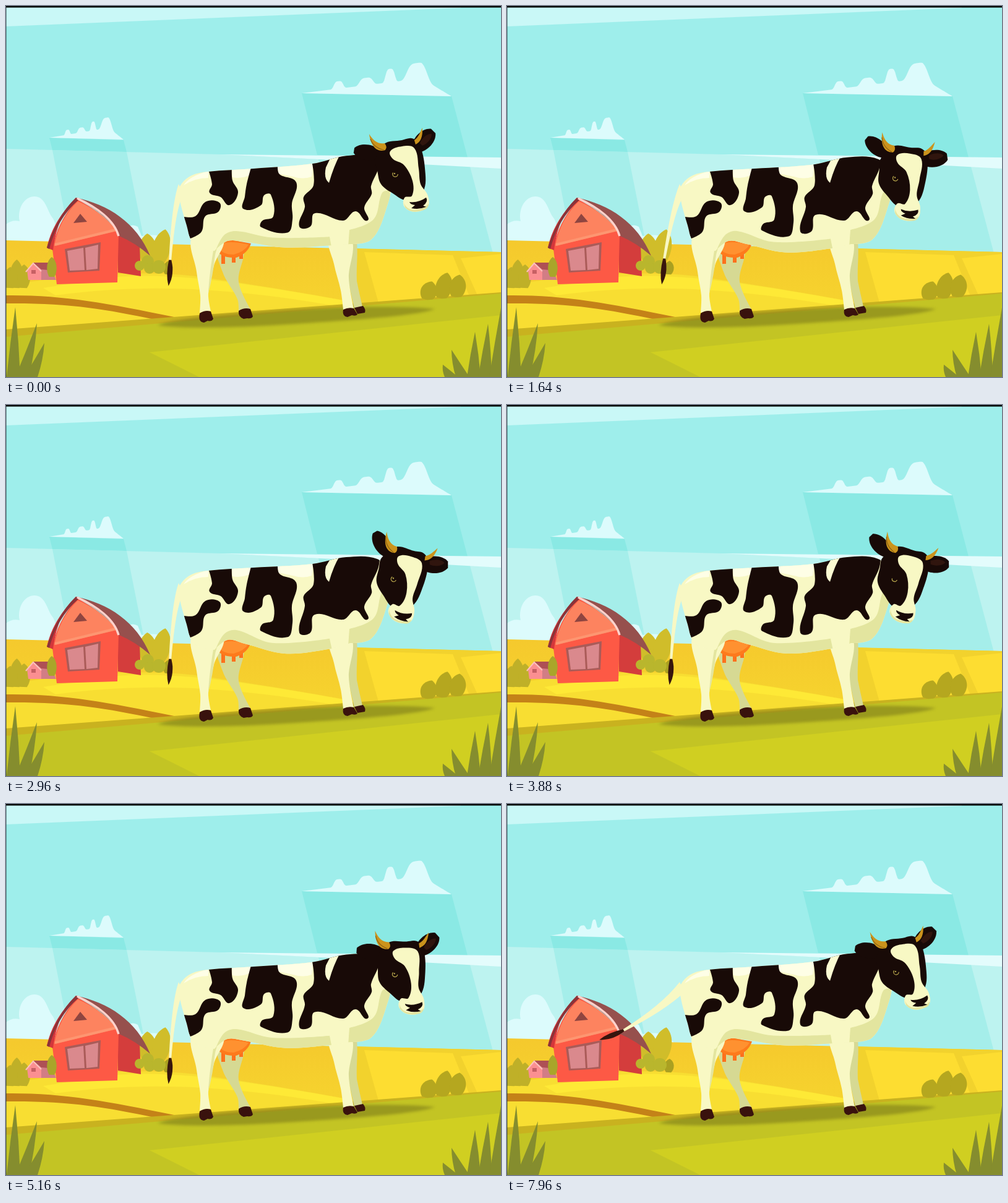
An HTML page with a canvas that plays this animation: 800 px wide and 600 px high, repeating every 8000 ms.

```html
<!DOCTYPE html>
<html lang="en">
<head>
<meta charset="utf-8">
<title>Cow in a field</title>
<style>
html, body { margin: 0; width: 100%; height: 100%; overflow: hidden; background: #9eeeeb; }
canvas { display: block; width: 800px; height: 600px; }
</style>
</head>
<body>
<canvas id="stage" width="800" height="600"></canvas>
<script>
const LOOP = 8000, RAD = Math.PI / 180;
const CREAM = '#f8f8c4', SHADE = '#e3e59f', FAR = '#d6d993', BLACK = '#180a07', HOOF = '#39120d', GOLD = '#cb931c';
const stage = document.getElementById('stage').getContext('2d');
const scene = document.createElement('canvas');
scene.width = 800;
scene.height = 600;
let g = stage;

const clamp = x => Math.max(0, Math.min(1, x));
const mix = (a, b, k) => a + (b - a) * k;
const ease = x => { x = clamp(x); return x * x * (3 - 2 * x); };
const pulse = (t, start, len) => t > start && t < start + len ? Math.sin(Math.PI * (t - start) / len) ** 2 : 0;

function fill(color, path) {
  g.fillStyle = color;
  g.fill(typeof path === 'string' ? new Path2D(path) : path);
}

function line(color, width, d) {
  g.strokeStyle = color;
  g.lineWidth = width;
  g.stroke(new Path2D(d));
}

// Closed smooth curve through "x,y" points; "!" marks a corner.
function curve(text) {
  const pts = text.split(' ').map(s => ({ xy: s.split(',').map(parseFloat), sharp: s.endsWith('!') }));
  const n = pts.length, path = new Path2D();
  const slope = i => {
    const a = pts[(i + n - 1) % n].xy, b = pts[(i + 1) % n].xy;
    const len = Math.hypot(b[0] - a[0], b[1] - a[1]);
    return pts[i].sharp ? [0, 0] : [(b[0] - a[0]) / len, (b[1] - a[1]) / len];
  };
  path.moveTo(...pts[0].xy);
  for (let i = 0; i < n; i++) {
    const j = (i + 1) % n, [ax, ay] = pts[i].xy, [bx, by] = pts[j].xy;
    const k = Math.hypot(bx - ax, by - ay) * 0.34, u = slope(i), v = slope(j);
    path.bezierCurveTo(ax + u[0] * k, ay + u[1] * k, bx - v[0] * k, by - v[1] * k, bx, by);
  }
  path.closePath();
  return path;
}

const blob = (color, text) => fill(color, curve(text));

function around(x, y, deg, draw) {
  g.save();
  g.translate(x, y);
  g.rotate(deg * RAD);
  g.translate(-x, -y);
  draw();
  g.restore();
}

// Leaf growing from (x, y); 0 degrees points right.
function leaf(color, x, y, len, wide, deg, tip = 0) {
  g.save();
  g.translate(x, y);
  g.rotate(deg * RAD);
  fill(color, `M0 ${-wide * 0.3}C${len * 0.3} ${-wide * 0.7} ${len * 0.8} ${-wide * 0.65} ${len} ${-tip}` +
    `V${tip}C${len * 0.8} ${wide * 0.65} ${len * 0.3} ${wide * 0.7} 0 ${wide * 0.3}Z`);
  g.restore();
}

function dots(color, list) {
  g.fillStyle = color;
  for (const [x, y, r] of list) {
    g.beginPath();
    g.arc(x, y, r, 0, 7);
    g.fill();
  }
}

// Cloud outline: a slope with four bumps, in parts of its width.
const BUMPS = [[0.245, 0.05, 0.035], [0.43, 0.05, 0.05], [0.59, 0.09, 0.035], [0.77, 0.107, 0.075]];
function cloud(x, y, wide, tilt, tall) {
  const path = new Path2D();
  path.moveTo(x, y);
  for (let u = 0; u <= 1; u += 1 / 120) {
    let h = 0.115 * Math.min(u / 0.8, 1, (1 - u) / 0.2);
    for (const [at, high, w] of BUMPS) h += high * Math.exp(-(((u - at) / w) ** 4));
    path.lineTo(x + wide * u, y + tilt * u - wide * tall * h);
  }
  path.lineTo(x + wide, y + tilt);
  fill('#dcfbfc', path);
}

function drawSky() {
  g.fillStyle = '#9eeeeb';
  g.fillRect(0, 0, 800, 600);
  fill('#c9f8f7', 'M0 0H735V3L0 33Z');
  fill('#bdf3f0', 'M0 231L345 240L800 262V410H0Z');
  fill('#8ae9e4', 'M478 141L720 146L746 245L503 241Z M70 213L190 217L195 236L75 233Z');
  fill('#a5eeea', 'M503 241L746 245L787 400H546Z M75 233L195 236L222 372L102 372Z');
  fill('#e3fcfc', 'M345 240L800 245V263L690 257Z');
  cloud(478, 141, 242, 5, 1);
  cloud(70, 213, 120, 3, 1.33);
  fill('#dcfbfc', 'M0 353Q10 345 22 348C18 330 28 308 46 308C63 308 66 329 74 341Q82 350 84 382H0Z');
  fill('#dcfbfc', 'M198 357Q204 352 213 357L219 372Q260 365 272 390H190Z');
}

function drawFields() {
  const gr = g.createLinearGradient(0, 380, 0, 500);
  gr.addColorStop(0, '#f5c92d');
  gr.addColorStop(1, '#f6d52e');
  g.fillStyle = gr;
  g.fill(new Path2D('M0 379L800 398V600H0Z'));
  fill('#f2d22d', 'M562 392L800 398V480H562Z');
  fill('#fddd31', 'M579 398L722 403L750 472L602 480Z M735 408L800 401V470H763Z');
  fill('#f8de32', 'M0 452C120 432 250 425 340 442C430 455 490 466 545 476V530H0Z');
  fill('#fee936', 'M80 468C250 444 400 462 545 487V476C400 450 250 425 150 442L60 456Z');
  fill('#c48218', 'M0 468C90 467 160 480 272 503L240 507C160 490 100 480 0 481Z');
  fill('#c9b21f', 'M0 523L270 503L800 463V500L0 540Z');
}

function drawBarn() {
  for (const [x, len] of [[6, 34], [16, 46], [28, 38]]) leaf('#bfb028', x, 456, len, 19, -88);
  for (const [x, len, deg] of [[230, 48, -92], [246, 56, -78]]) leaf('#d0bd2a', x, 416, len, 26, deg);
  leaf('#aaa021', 261, 434, 22, 14, -85);
  // small barn
  fill('#d27d85', 'M45 415L70 415L81 443L57 443Z');
  fill('#fb8f91', 'M34 427L44 416L57 427V443L36 443Z');
  fill('#ae5055', 'M44 415L70 415L80 428L57 426Z');
  line('#fbc2bd', 2, 'M32 430L44 416L57 429');
  fill('#c76064', 'M41 427H48V433H41Z');
  // large barn
  fill('#d43d3c', 'M180 360L216 388L218 437L181 431Z');
  fill('#96504d', 'M113 310C165 321 211 350 233 404Q209 383 183 372C174 350 145 327 113 310Z');
  fill('#fd5945', 'M115 313C139 325 167 344 182 371L180 447L82 450L75 393Q82 350 115 313Z');
  fill('#fd835f', 'M116 316C140 326 164 342 179 364L78 388Q86 345 116 316Z');
  line('#fd9671', 4, 'M79 386L177 362');
  fill('#d5363a', 'M115 311C96 325 82 350 76 395L66 391C72 365 84 340 113 310Z');
  fill('#8b3339', 'M113 310C90 332 75 362 66 391L70 393C79 360 93 335 117 314Z');
  line('#ffd2cc', 3.5, 'M115 311C146 325 175 346 182 372');
  fill('#8f4540', 'M120 336L131 349L109 351Z');
  fill('#aa5b58', 'M95 393L153 382L151 428L100 431Z');
  fill('#da898d', 'M99 396L125 391L127 427L103 428Z M128 391L149 386L148 425L130 427Z');
  dots('#b9b62d', [[216, 420, 8], [229, 413, 10], [232, 424, 9], [247, 422, 11]]);
  leaf('#a9a52a', 74, 438, 32, 14, -90);
}

function blades(tips, foot, step) {
  tips.forEach(([x, y], i) => {
    const b = foot + step * i;
    fill('#858d2e', `M${b - 11} 600Q${mix(b, x, 0.6) - 7} ${mix(600, y, 0.5)} ${x} ${y}` +
      `Q${mix(b, x, 0.6) + 7} ${mix(600, y, 0.5)} ${b + 11} 600Z`);
  });
}

function drawGrass() {
  for (const [x, y, len, deg] of [[679, 475, 31, -72], [703, 473, 43, -76], [727, 471, 37, -80]])
    leaf('#b5a71f', x, y, len, 24, deg);
  fill('#c3c424', 'M0 535L800 465V600H0Z');
  fill('#d0cf21', 'M232 560L800 500V600H312Z');
  g.filter = 'blur(2px)';
  fill('rgba(112,111,24,.5)', 'M245 516C270 506 340 500 430 494C530 486 640 484 693 490C670 500 575 507 470 514C370 521 280 522 245 516Z');
  g.filter = 'none';
  blades([[15, 487], [50, 513], [62, 545]], 12, 14);
  blades([[706, 580], [720, 556], [758, 527], [779, 514], [800, 488]], 720, 18);
}

function drawScene() {
  g = scene.getContext('2d');
  drawSky();
  drawFields();
  drawBarn();
  drawGrass();
  g.fillStyle = '#000';
  g.fillRect(0, 0, 800, 2.5);
  g.fillStyle = 'rgba(20,50,50,.55)';
  g.fillRect(0, 2, 1, 598);
  g = stage;
}

const swing = t => pulse(t, 0, 750) + pulse(t, 750, 750) + 0.55 * pulse(t, 1500, 900) + pulse(t, 7600, 800);

function drawTail(t) {
  const q = swing(t), a = 98.5 + 44.5 * q, b = 91 + 82 * swing(t - 80);
  const x = 283 + 120 * Math.cos(a * RAD), y = 292 + 120 * Math.sin(a * RAD);
  const nx = 2 * Math.sin(a * RAD), ny = -2 * Math.cos(a * RAD);
  const cx = 271 - 19 * q, cy = 322 + 8 * q;
  fill(CREAM, `M279 288Q${cx - 3} ${cy - 4} ${x - nx} ${y - ny}L${x + nx} ${y + ny}Q${cx + 3} ${cy + 4} 287 304Z`);
  around(x, y, b - 90, () =>
    fill('#37150d', `M${x - 2} ${y}Q${x - 7} ${y + 24} ${x - 2} ${y + 42}Q${x + 8} ${y + 24} ${x + 2} ${y}Z`));
}

function drawLegs() {
  blob(FAR, '344,385 350,430 374,474 376,493! 395,490! 376,446 382,385');
  fill(HOOF, 'M376 493Q385 487 395 490L399 502Q397 506 390 505L384 506Q375 503 376 493Z');
  fill(FAR, 'M550 380H567C569 405 566 420 567 445Q571 465 576 486L563 489Q555 455 550 430Z');
  fill(HOOF, 'M563 488L577 485Q582 491 580 496L568 498Z');
  for (const [x, end] of [[351, 417], [368, 415], [380, 409]]) line('#fd701c', 6, `M${x} 395V${end}`);
  fill('#fd7a1c', 'M339 390Q344 379 362 378L396 384Q390 401 372 407Q343 408 339 390Z');
  fill('#ff9130', 'M343 388Q355 377 392 386Q386 397 368 402Q347 402 343 388Z');
  blob(CREAM, '303,368 308,430 314,468 313,496! 331,493! 327,465 336,420 350,372');
  fill(SHADE, 'M350 375Q339 390 337 409Q335 432 327 465Q328 435 338 378Z');
  fill(HOOF, 'M313 497Q322 491 331 494L335 506Q332 511 326 509L320 512Q310 511 313 497Z');
  blob(CREAM, '524,372 530,417 541,460 545,491! 562,489! 554,440 558,375');
  fill(HOOF, 'M545 491Q553 487 562 489L568 499Q565 502 559 500L552 503Q543 502 545 491Z');
}

// p lowers the head, and with it the belly and shoulders
function drawBody(p) {
  const sag = 12 * p, top = 4 * p;
  const body = curve(`284,287 300,274 326,268 400,263 495,${255 + top / 2} 550,${242 + top} 600,${245 + top} ` +
    `623,275 613,333 590,378 556,385! 525,${387 + sag * 0.6} 450,${390 + sag} 385,${381 + sag * 0.4} 358,380 337,396! 304,386 292,355 279,302`);
  g.save();
  fill(CREAM, body);
  g.clip(body);
  blob(SHADE, `337,400! 352,371 372,364 430,${374 + sag * 0.9} 523,${373 + sag * 0.4}! 530,410! 440,415 360,385`);
  blob(SHADE, '620,298! 608,302 594,345 555,362! 553,392! 590,392 620,350');
  fill('#fefee6', 'M287 290Q296 275 327 267V278Q305 278 287 290Z M365 262L398 261L396 273Q380 280 366 277Z M438 260L497 253L494 276Q480 281 464 276L440 271Z');
  blob(BLACK, '326,262! 365,260! 366,282 375,302 361,322 347,309 329,302 333,288');
  blob(BLACK, '283,340! 306,340 322,317 345,318 343,333 322,340 316,365 298,376!');
  g.save();
  g.translate(0, -262 * 0.09 * p);
  g.scale(1, 1 + 0.09 * p);
  blob(BLACK, '397,258! 439,258! 442,272 469,285 462,320 463,345 455,366 412,357 414,347 432,340 428,305 417,306 412,322 384,328 386,308 389,288');
  g.restore();
  blob(BLACK, `494,250! 530,235! 605,235! 602,262 590,291 591,304 579,326 584,347 565,332 ` +
    `545,347 499,${335 + sag / 3} 492,${356 + sag} 474,${356 + sag} 483,325 481,309 497,290`);
  fill('#fbfbd2', `M526 ${242 + top}L541 ${238 + top}Q530 258 522 286Q513 279 517 261Z`);
  g.restore();
}

function drawEye(t) {
  const shut = pulse(t, 3760, 240) + pulse(t, 7000, 240) > 0.4;
  g.strokeStyle = '#b5a44b';
  g.lineWidth = 1.3;
  g.beginPath();
  g.arc(629, 272, 4.2, 0, (shut ? 170 : 215) * RAD);
  g.stroke();
  if (!shut) dots('#b5a44b', [[628, 271, 1.2]]);
}

function drawHead(t, p) {
  const droop = ease((t - 250) / 1100) * (1 - ease((t - 3900) / 1050));
  const back = pulse(t, 4300, 1700);
  const flick = pulse(t, 7040, 400) + pulse(t, 7440, 400);
  const left = 14 * droop - 13 * back + 13 * (pulse(t, 2720, 440) + pulse(t, 3240, 440)) + 5 * flick;
  const right = 20 * droop - 6 * back - 16 * flick;
  around(606, 271, 26 * p - 1.4, () => {
    leaf(BLACK, 661, 232, 42, 24, right - 45, 5);
    leaf('#30150e', 671, 224, 24, 9, right - 45);
    leaf(BLACK, 604, 240, 42, 22, left + 189, 4);
    blob(BLACK, '597,249 611,223 640,217 656,214 668,223 677,262 674,300 648,314 625,303 606,288 600,266');
    blob(CREAM, '621,235 640,227 660,230 667,263 670,288 681,305 682,324 662,333 644,325 644,310 656,307 657,283 643,257 625,247');
    fill(SHADE, 'M642 316Q646 329 659 330Q674 330 683 320Q683 328 675 330Q655 337 645 326Z');
    fill(BLACK, 'M652 317Q666 319 679 310Q683 317 674 323L679 325Q667 330 655 327L661 322Q653 321 652 317Z');
    fill(GOLD, 'M587 207C593 217 601 224 612 222Q617 228 613 233C601 237 590 229 587 207Z');
    line('#8d6215', 1.2, 'M589 215Q594 229 611 233');
    fill(GOLD, 'M673 197C674 212 670 220 662 224L660 217C667 212 669 205 673 197Z');
    drawEye(t);
  });
}

function draw(t) {
  // one slow nod, wrapping over the loop's end
  const p = t > 3700 && t < 7560 ? 1 - ease((t - 3700) / 2500)
    : ease(((t >= 7560 ? t - LOOP : t) + 440) / 3250);
  g.drawImage(scene, 0, 0);
  drawTail(t);
  drawLegs();
  drawBody(p);
  drawHead(t, p);
}

drawScene();
const start = performance.now();
function tick() {
  const t = (performance.now() - start) % LOOP;
  draw(Math.floor(t / 40) * 40);
  requestAnimationFrame(tick);
}
draw(0);
requestAnimationFrame(tick);
</script>
</body>
</html>
```
